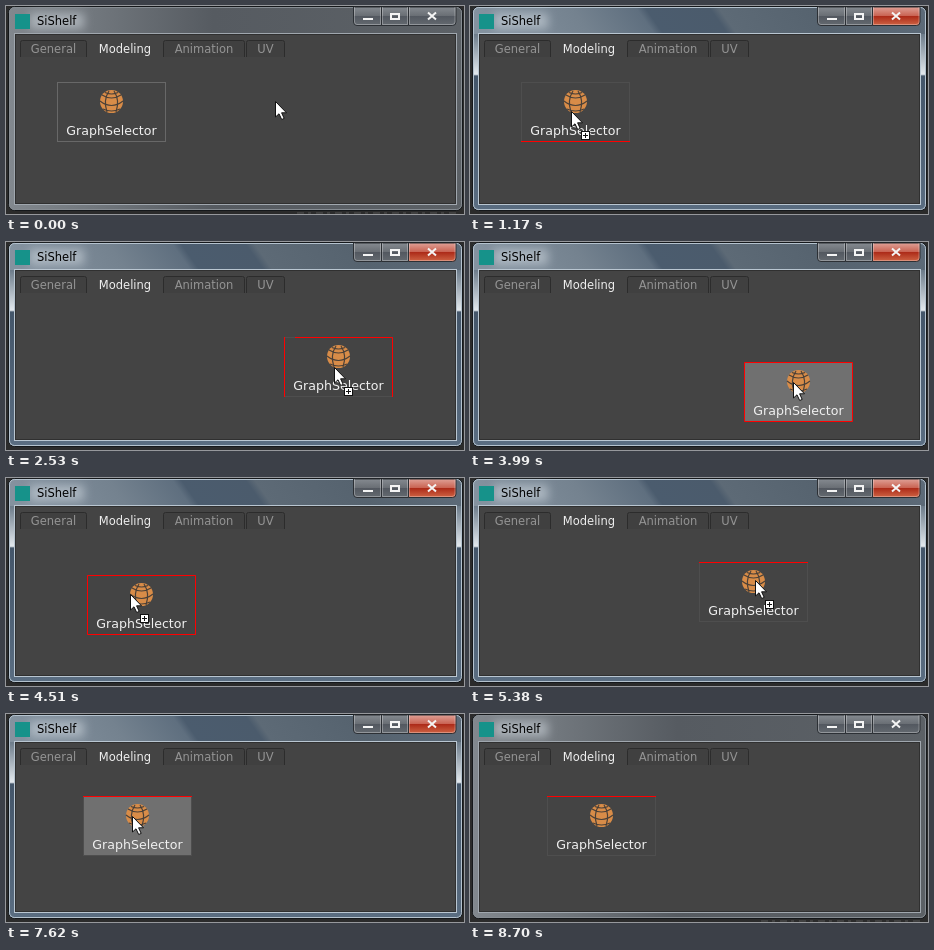
These frames come from a looping animation (458x208 px, 8740 ms). An HTML page:

```html
<!DOCTYPE html>
<html lang="en">
<head>
<meta charset="utf-8">
<title>Shelf drag</title>
<style>
  html, body { margin: 0; width: 100%; height: 100%; overflow: hidden; background: #2b2b2b; }
  svg { display: block; }
  text { font: 11.5px "DejaVu Sans", sans-serif; }
</style>
</head>
<body>
<svg width="458" height="208" viewBox="0 0 458 208">
  <defs>
    <linearGradient id="idleGlass">
      <stop offset="0" stop-color="#82888e"/><stop offset=".2" stop-color="#70767c"/>
      <stop offset=".45" stop-color="#565b61"/><stop offset="1" stop-color="#5c6166"/>
    </linearGradient>
    <linearGradient id="activeGlass" gradientUnits="userSpaceOnUse" x1="0" y1="0" x2="458" y2="0" gradientTransform="skewX(35)">
      <stop offset="0" stop-color="#84929f"/><stop offset=".22" stop-color="#74828f"/>
      <stop offset=".36" stop-color="#5f6f7f"/><stop offset=".38" stop-color="#4b5c6e"/>
      <stop offset=".52" stop-color="#4b5b6c"/><stop offset=".54" stop-color="#5d6a76"/>
      <stop offset=".75" stop-color="#56636f"/><stop offset="1" stop-color="#5d6b79"/>
    </linearGradient>
    <linearGradient id="side" gradientUnits="userSpaceOnUse" x1="0" y1="28" x2="0" y2="203">
      <stop offset="0" stop-color="#6c7b89"/><stop offset=".23" stop-color="#e3e9ee"/>
      <stop offset=".24" stop-color="#44566a"/><stop offset="1" stop-color="#5a6d81"/>
    </linearGradient>
    <linearGradient id="gray" x2="0" y2="1">
      <stop offset="0" stop-color="#858a90"/><stop offset=".5" stop-color="#686d73"/>
      <stop offset=".5" stop-color="#535860"/><stop offset="1" stop-color="#646a70"/>
    </linearGradient>
    <linearGradient id="red" x2="0" y2="1">
      <stop offset="0" stop-color="#dfa096"/><stop offset=".5" stop-color="#c8604f"/>
      <stop offset=".5" stop-color="#ac2a18"/><stop offset="1" stop-color="#cf6545"/>
    </linearGradient>
    <filter id="blur" x="-30%" y="-80%" width="160%" height="260%"><feGaussianBlur stdDeviation="5"/></filter>
  </defs>

  <rect width="458" height="208" fill="#2b2b2b"/>
  <path id="desktopMarks" d="M291 207H452" stroke="#555" stroke-dasharray="7 4 3 5"/>
  <rect id="glass" x="2.5" y=".5" width="454" height="204" rx="6" stroke="#15181b"/>
  <path id="sides" d="M4 28H8V199H451V28H455V203H4Z" fill="url(#side)"/>
  <rect id="rim" x="3.5" y="1.5" width="452" height="202" rx="5" fill="none"/>
  <rect x="24" y="7" width="54" height="16" fill="#dce3ea" opacity=".5" filter="url(#blur)"/>
  <rect x="9" y="8" width="15" height="15" fill="#16928a"/>
  <text x="31" y="19" fill="#000">SiShelf</text>

  <g stroke="#2c3035">
    <path d="M347.5 1V16q0 3.500 3.500 3.500H375.500V1Z" fill="url(#gray)"/>
    <path d="M375.500 1V19.500H402.500V1Z" fill="url(#gray)"/>
    <path id="close" d="M402.500 1V19.500H446.500q3.500 0 3.500-3.500V1Z"/>
  </g>
  <path d="M348.500 1V16q0 2.500 2.500 2.500H374.500V1M376.500 1V18.500H401.500V1M403.500 1V18.500H446q3 0 3-2.500V1" fill="none" stroke="#fff" stroke-opacity=".3"/>
  <g fill="none" stroke="#f4f4f4" stroke-width="2">
    <path d="M357 13H367"/>
    <rect x="385" y="8" width="8" height="5"/>
    <path d="M422 6.500L430 13.500M430 6.500L422 13.500"/>
  </g>

  <rect id="client" x="8.500" y="27.500" width="442" height="171" fill="#444"/>
  <rect x="9.500" y="28.500" width="440" height="169" fill="none" stroke="#303030"/>
  <g id="tabs"></g>

  <g id="button">
    <rect id="frame" x=".5" y=".5" width="108" height="59"/>
    <path id="marker" fill="none" stroke="#f00"/>
    <circle cx="54.500" cy="19.500" r="11.500" fill="#d88c48"/>
    <g fill="none" stroke="#4a4038" stroke-width="1.200">
      <path d="M45 13Q54.500 19 64 13M43 19Q54.500 28 66 19M48 10.500Q54.500 13.500 61 10.500M46 27Q54.500 31 63 27"/>
      <path d="M52 9Q46 18 50 30M57 9Q63 18 59 30"/>
    </g>
    <text x="54.500" y="53" fill="#f0f0f0" text-anchor="middle" style="font-size:12.600px">GraphSelector</text>
  </g>

  <g id="cursor">
    <path d="M.5 .5V16L4 12.800L6.700 18.500L9.200 17.400L6.600 11.800H11.500Z" fill="#fff" stroke="#111"/>
    <g id="badge">
      <rect x="10.500" y="20.500" width="8" height="8" fill="#fff" stroke="#111"/>
      <path d="M12 24.500H17M14.500 22V27" stroke="#111"/>
    </g>
  </g>
</svg>

<script>
const LOOP = 8740, LAG = 15, BUTTON_W = 109, BUTTON_H = 60;
const byId = id => document.getElementById(id);

// Pointer path: time, x, y
const path = [
  [0, 269, 95], [460, 269, 95], [1020, 101, 105], [1170, 101, 105],
  [1635, 297, 106], [1650, 300, 106], [1740, 334, 106], [1990, 334, 106],
  [2530, 328, 125], [2740, 324, 149], [3130, 324, 149], [3560, 203, 150],
  [3990, 323, 140], [4050, 323, 140], [4630, 100, 113], [5060, 100, 113],
  [5365, 277, 104], [5380, 285, 102], [5630, 314, 103], [6620, 314, 103],
  [6755, 255, 103], [6770, 252, 101], [7200, 126, 102], [7620, 126, 102],
  [8210, 352, 212], [LOOP, 352, 212]
];
const drags = [
  { start: 1170, end: 2980, grab: [50, 29] },
  { start: 4050, end: 5910, grab: [49, 20] },
  { start: 6620, end: 7410, grab: [49, 20] }
];

// Red edges of the button from each time on
const TOP = "M0 .5H109";
const markers = [
  [0, ""], [1170, "M0 59.5H109"], [1990, "M11 .5H108.5V60M.5 0V60"],
  [2740, "M.5 .5H108.5V59.5H.5Z"], [5060, TOP],
  [6620, "M107.5 9V.5H.5V59.5H108.5V9"], [7100, TOP]
];

const slope = (i, axis) => path[i] && path[i + 1]
  ? (path[i + 1][axis] - path[i][axis]) / (path[i + 1][0] - path[i][0]) : 0;

function tangent(i, axis) {
  const a = slope(i - 1, axis), b = slope(i, axis);
  return a * b > 0 ? 2 * a * b / (a + b) : 0;
}

// Monotone cubic interpolation, so holds stay still
function pointer(t) {
  const i = Math.max(0, path.findIndex(key => key[0] > t) - 1);
  const [from, to] = [path[i], path[i + 1]];
  const span = to[0] - from[0], u = (t - from[0]) / span, v = 1 - u;
  return [1, 2].map(axis => Math.round(
    from[axis] * v * v * (1 + 2 * u) + to[axis] * u * u * (3 - 2 * u) +
    span * u * v * (v * tangent(i, axis) - u * tangent(i + 1, axis))));
}

const place = (el, [x, y]) => el.setAttribute("transform", `translate(${x} ${y})`);
const show = (el, on) => el.setAttribute("visibility", on ? "visible" : "hidden");
const paint = (id, attrs) => {
  for (const name in attrs) byId(id).setAttribute(name, attrs[name]);
};

function draw(t) {
  const active = t >= 1170 && t < 8700;
  const drag = drags.findLast(d => d.start <= t) || drags[0];
  const dragging = t >= drag.start && t < drag.end;
  const cursor = pointer(t);
  const held = pointer(Math.max(drag.start, Math.min(t - LAG, drag.end)));
  const box = held.map((v, i) => v - drag.grab[i]);
  const [dx, dy] = cursor.map((v, i) => v - box[i]);
  const hover = !dragging && dx >= 0 && dx < BUTTON_W && dy >= 0 && dy < BUTTON_H;

  place(byId("button"), box);
  place(byId("cursor"), cursor);
  show(byId("badge"), dragging);
  show(byId("sides"), active);
  show(byId("desktopMarks"), !active);
  paint("glass", { fill: `url(#${active ? "activeGlass" : "idleGlass"})` });
  paint("rim", { stroke: active ? "#b4c2ce" : "#868c92" });
  paint("client", { stroke: active ? "#b9c6d1" : "#a0a7ae" });
  paint("close", { fill: `url(#${active ? "red" : "gray"})` });
  paint("frame", {
    fill: hover ? "#707070" : "#444",
    stroke: t < 1170 ? "#686868" : "#4e4e4e"
  });
  paint("marker", { d: markers.findLast(m => m[0] <= t)[1] });
}

byId("tabs").innerHTML = [
  ["General", 14, 67], ["Modeling", 83, 72], ["Animation", 157, 82], ["UV", 240, 39]
].map(([label, x, w]) => {
  const current = label === "Modeling";
  const outline = current ? "" :
    `<path d="M${x + .5} 51V36.5q0-2 2-2H${x + w - 2.5}q2 0 2 2V51" fill="#404040" stroke="#2c2c2c"/>`;
  return `${outline}<text x="${x + w / 2}" y="47" text-anchor="middle" fill="${current ? "#eee" : "#949494"}">${label}</text>`;
}).join("");

function tick(now) {
  draw(now % LOOP);
  requestAnimationFrame(tick);
}
draw(0);
requestAnimationFrame(tick);
</script>
</body>
</html>
```
